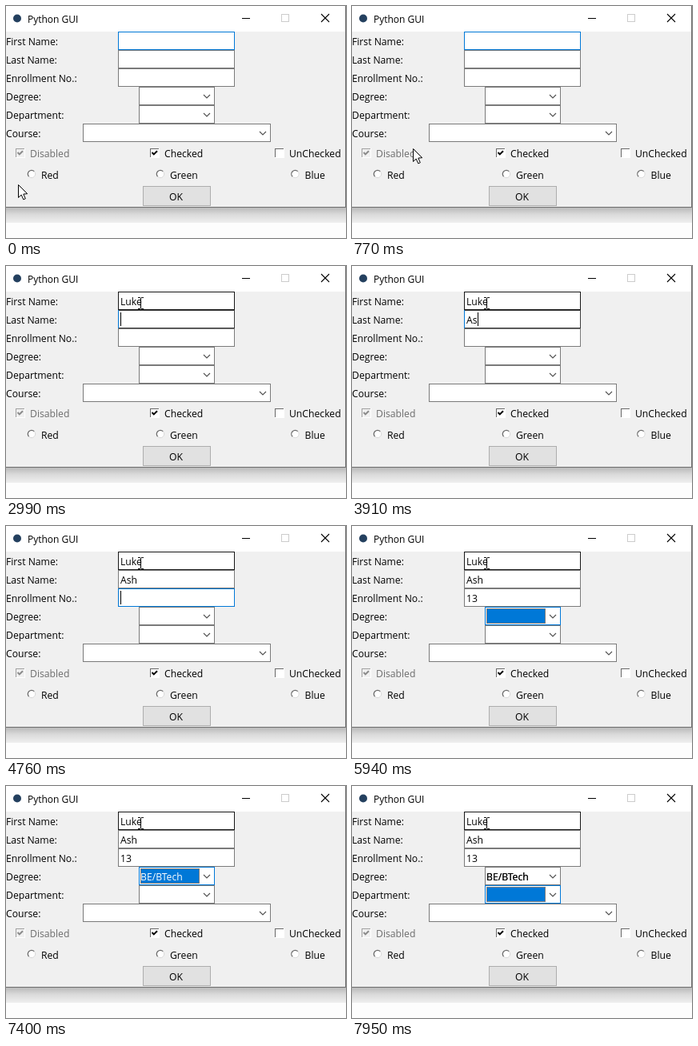
An HTML page with a canvas for the animation above (8 s loop, 425 px wide and 290 px high).

```html
<!DOCTYPE html>
<html lang="en">
<head>
<meta charset="utf-8">
<title>Python GUI</title>
<style>
html, body { margin: 0; width: 100%; height: 100%; overflow: hidden; background: #fdfdfd; }
canvas { display: block; }
</style>
</head>
<body>
<canvas id="stage" width="425" height="290"></canvas>
<script>
const LOOP = 8000;
const BLUE = '#0078d7', GREY = '#7a7a7a', DARK = '#171717', FACE = '#f0f0f0';
const ctx = document.getElementById('stage').getContext('2d', { alpha: false });

function rect(x, y, w, h, color) {
  ctx.fillStyle = color;
  ctx.fillRect(x, y, w, h);
}

function box(x, y, w, h, border, fill) {
  rect(x, y, w, h, border);
  rect(x + 1, y + 1, w - 2, h - 2, fill);
}

function line(points, color, width = 1) {
  ctx.beginPath();
  points.forEach(([x, y]) => ctx.lineTo(x, y));
  ctx.strokeStyle = color;
  ctx.lineWidth = width;
  ctx.stroke();
}

function text(str, x, y, color = '#000', size = 12.2) {
  ctx.font = `${size}px "Open Sans", "Noto Sans", sans-serif`;
  ctx.fillStyle = color;
  ctx.fillText(str, x, y);
  return ctx.measureText(str).width;
}

function drawWindow() {
  const shadow = ctx.createLinearGradient(0, 252, 0, 271);
  shadow.addColorStop(0, '#b9b9b9');
  shadow.addColorStop(0.45, '#dadada');
  shadow.addColorStop(1, '#efefef');
  rect(0, 0, 425, 290, '#fdfdfd');
  rect(0, 252, 425, 19, shadow);
  rect(0, 0, 425, 252, '#6f6f6f');
  rect(0, 0, 424, 32, '#fff');
  rect(0, 32, 424, 219, FACE);

  ctx.beginPath();
  ctx.arc(14, 15.5, 5, 0, 7);
  ctx.fillStyle = '#24405f';
  ctx.fill();
  text('Python GUI', 27, 21, '#000', 12);
  rect(295, 15, 10, 1, '#000');
  box(344, 10, 10, 10, '#ccc', '#fff');
  line([[394, 10], [404, 20]], '#000', 1.1);
  line([[404, 10], [394, 20]], '#000', 1.1);
}

function entry(y, border, str, caret) {
  box(140, y, 146, 23, border, '#fff');
  const w = str ? text(str, 143, y + 17) : 0;
  if (caret) rect(143 + Math.round(w), y + 3, 1, 17, '#000');
}

function combo(x, y, w, { value = '', focus = false, open = false } = {}) {
  box(x, y, w, 23, focus ? BLUE : GREY, '#fff');
  if (open) box(x + w - 19, y, 19, 23, BLUE, '#cce4f7');
  if (focus) {
    rect(x + 2, y + 2, w - 21, 19, BLUE);
    ctx.setLineDash([1, 1]);
    ctx.strokeStyle = '#ff8728';
    ctx.lineWidth = 1;
    ctx.strokeRect(x + 2.5, y + 2.5, w - 22, 18);
    ctx.setLineDash([]);
  }
  if (value) {
    text(value, x + 2, y + 17, focus ? '#fff' : '#000');
    if (!focus) text(value, x + 2, y + 17);
  }
  const cx = x + w - 10, cy = y + 12;
  line([[cx - 4, cy - 2], [cx, cy + 2], [cx + 4, cy - 2]], '#4f4f4f', 1.1);
}

function check(x, label, on, disabled) {
  const y = 178;
  rect(x, y, 12, 12, '#fff');
  rect(x, y, 11, 11, disabled ? '#a0a0a0' : '#696969');
  rect(x + 1, y + 1, 10, 10, disabled ? FACE : '#fff');
  if (on) {
    line([[x + 2.5, y + 5], [x + 4.8, y + 7.4], [x + 9, y + 3.2]], disabled ? '#8a8a8a' : '#000', 2);
  }
  text(label, x + 18, 189, disabled ? '#6d6d6d' : '#000');
}

function radio(x, label) {
  const y = 210;
  ctx.beginPath();
  ctx.arc(x, y, 5, 0, 7);
  ctx.fillStyle = '#fff';
  ctx.fill();
  ctx.beginPath();
  ctx.arc(x, y, 4.7, Math.PI * 0.75, Math.PI * 1.75);
  ctx.strokeStyle = '#6c6c6c';
  ctx.lineWidth = 1.3;
  ctx.stroke();
  ctx.beginPath();
  ctx.arc(x, y, 4.7, -Math.PI * 0.25, Math.PI * 0.75);
  ctx.strokeStyle = '#d8d8d8';
  ctx.lineWidth = 1;
  ctx.stroke();
  text(label, x + 12, 216);
}

function dropdown() {
  box(166, 124, 95, 76, '#4c4c4c', '#fff');
  rect(168, 126, 91, 18, BLUE);
  ['BE/BTech', 'ME/MTech', 'BSc', 'MSc'].forEach((item, i) =>
    text(item, 168, 140 + 18 * i, i ? '#000' : '#fff'));
}

function arrow(x, y) {
  ctx.beginPath();
  [[0, 0], [0, 16], [3.7, 12.6], [6.3, 18.4], [8.8, 17.3], [6.3, 11.6], [11.2, 11.2]]
    .forEach(([dx, dy]) => ctx.lineTo(x + dx + 0.5, y + dy + 0.5));
  ctx.closePath();
  ctx.fillStyle = '#fff';
  ctx.fill();
  ctx.strokeStyle = '#000';
  ctx.lineWidth = 1;
  ctx.stroke();
}

function beam(x, y) {
  rect(x, y - 6, 1, 13, '#000');
  for (const dy of [-7, 7]) {
    rect(x - 3, y + dy, 3, 1, '#000');
    rect(x + 1, y + dy, 3, 1, '#000');
  }
}

function drawPointer(t) {
  if (t >= 420 && t < 600) return;
  if (t < 420) {
    const step = t < 300 ? 0 : t < 360 ? 1 : 2;
    return arrow(15 - 6 * step, 223 + 20 * step * step);
  }
  if (t >= 6900 && t < 7400) return arrow(167, 44);
  const p = Math.min(8, Math.floor((t - 600) / 60)) / 8;
  const ease = p * (2 - p);
  const x = Math.round(4 + 164 * ease), y = Math.round(280 - 234 * ease);
  if (x > 140 && y < 55) beam(x, y); else arrow(x, y);
}

const within = (t, spans) => spans.some(([a, b]) => t >= a && t < b);

// The part of a word whose key times have passed.
const typed = (word, times, t) => word.slice(0, times.filter(k => t >= k).length);

function draw(t) {
  const first = typed('Luke', [2000, 2310, 2560, 2740], t);
  const last = typed('Ash', [3610, 3910, 4090], t);
  const number = typed('13', [5490, 5690], t);
  const open = t >= 6900 && t < 7400;
  const hover = t >= 2990 && !open;

  drawWindow();
  ['First Name:', 'Last Name:', 'Enrollment No.:', 'Degree:', 'Department:', 'Course:']
    .forEach((label, i) => text(label, 0, 49 + 23 * i));

  entry(32, t < 2990 ? BLUE : hover ? DARK : GREY, first,
    within(t, [[60, 660], [910, 1510], [1750, 2990]]));
  const onLast = t >= 2990 && t < 4760;
  entry(55, onLast ? '#3c3c3c' : GREY, last, within(t, [[2990, 4460]]));
  if (onLast) rect(140, 55, 1, 23, BLUE);
  entry(78, t >= 4760 && t < 5940 ? BLUE : GREY, number,
    within(t, [[4760, 5390], [5490, 5940]]));

  combo(166, 101, 95, {
    value: t >= 7400 ? 'BE/BTech' : '',
    focus: t >= 5940 && t < 7950 && !open,
    open
  });
  combo(166, 124, 95, { focus: t >= 7950 });
  combo(96, 147, 235);

  check(12, 'Disabled', true, true);
  check(180, 'Checked', true);
  check(336, 'UnChecked', false);
  radio(32, 'Red');
  radio(193, 'Green');
  radio(361.5, 'Blue');
  box(171, 225, 85, 25, '#adadad', '#e1e1e1');
  text('OK', 204, 243);

  if (open) dropdown();
  drawPointer(t);
}

const start = performance.now();
function tick() {
  draw((performance.now() - start) % LOOP);
  requestAnimationFrame(tick);
}
draw(0);
requestAnimationFrame(tick);
</script>
</body>
</html>
```
